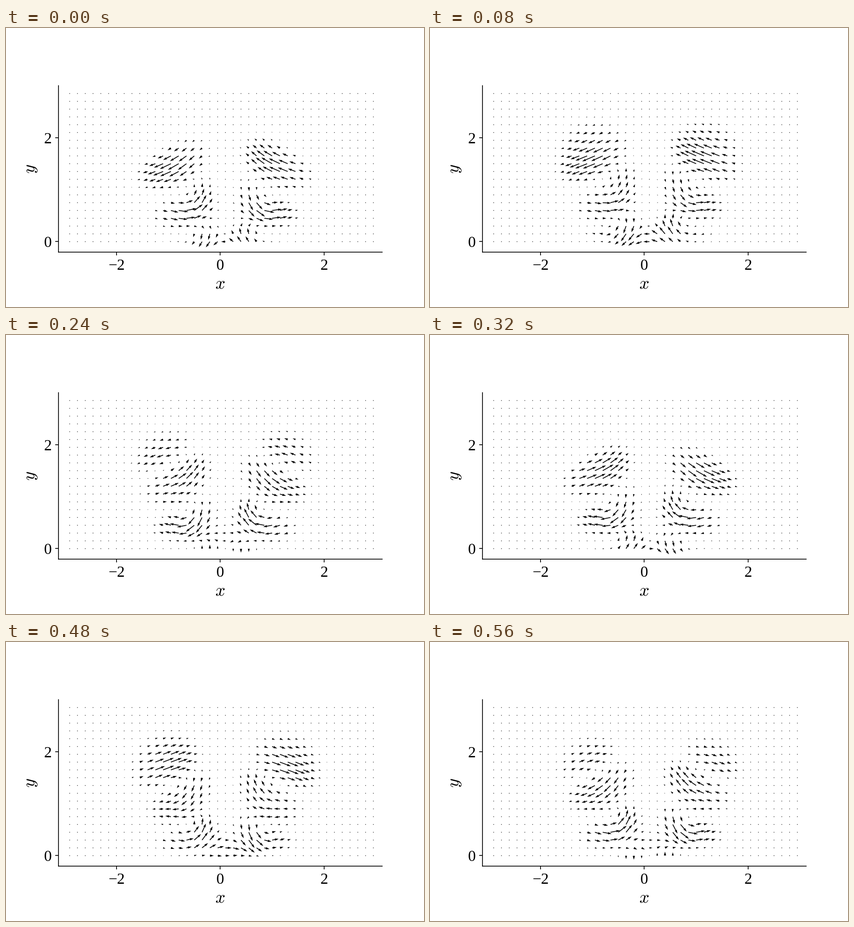
A matplotlib script for the animation above (640 ms loop, 900x600 px).

```python
import numpy as np
import matplotlib.pyplot as plt
from matplotlib.animation import FuncAnimation
from matplotlib.transforms import IdentityTransform

FRAMES, INTERVAL = 8, 80
AXIS_X = 0.1  # mirror axis of the wave

plt.rcParams.update({
    "font.family": "Liberation Serif",
    "mathtext.fontset": "cm",
    "font.size": 16,
})


def phase(d, y):
    """Wave fronts climb from the bottom and slow down near the top."""
    height = y * (1 + 0.3 * (d - 1.1))
    rest = np.clip(1 - height / 1.9, 0, None)
    return np.radians(220 - 400 * rest**1.3)


def lobe(d, y, centre, size):
    return np.exp(-((d - centre[0]) / size[0])**2 - ((y - centre[1]) / size[1])**2)


def wing(d, y):
    """Complex (u, v) of one half of the mirrored wave, in pixels."""
    outer = lobe(d, y, (1.08, 1.6), (0.53, 0.55))
    inner = lobe(d, y, (0.6, 1.35), (0.33, 0.4))
    low_outer = lobe(d, y, (0.8, 0.52), (0.47, 0.42))
    low_inner = lobe(d, y, (0.5, 0.55), (0.28, 0.45))
    base = lobe(d, y, (0.24, 0.08), (0.35, 0.25))

    u = 28 * outer + 22 * low_outer + 11 * base
    v = 11 * outer + 10 * inner - 7 * low_outer + 24 * low_inner + 12 * base
    angle = phase(np.abs(d), y)
    lag = np.radians(45 * (1.3 - np.abs(d)))
    return u * np.exp(1j * angle), v * np.exp(1j * (angle - lag))


x, y = np.meshgrid(-2.9 + 0.15 * np.arange(40), 0.15 * np.arange(20))
left_u, left_v = wing(AXIS_X - x, y)
right_u, right_v = wing(x - AXIS_X, y)
wave_u, wave_v = left_u + right_u, left_v - right_v


def field(i):
    turn = np.exp(-1j * (2 * np.pi * i / FRAMES - np.pi / 4))
    return (wave_u * turn).real, (wave_v * turn).real


fig, ax = plt.subplots(figsize=(6, 4), dpi=150)
ax.set_aspect("equal")
ax.set_xlim(-3.12, 3.12)
ax.set_ylim(-0.2, 3)
ax.set_xticks([-2, 0, 2])
ax.set_yticks([0, 2])
ax.spines[["top", "right"]].set_visible(False)

pixels = IdentityTransform()
ax.set_xlabel("$x$", fontsize=18, va="baseline")
ax.set_ylabel("$y$", fontsize=18, va="baseline")
ax.xaxis.set_label_coords(461.25, 39, transform=pixels)
ax.yaxis.set_label_coords(62, 297, transform=pixels)

arrows = ax.quiver(x, y, *field(0), scale=1, scale_units="dots")


def update(i):
    arrows.set_UVC(*field(i))
    return (arrows,)


anim = FuncAnimation(fig, update, frames=FRAMES, interval=INTERVAL, repeat=True)
plt.show()
```
